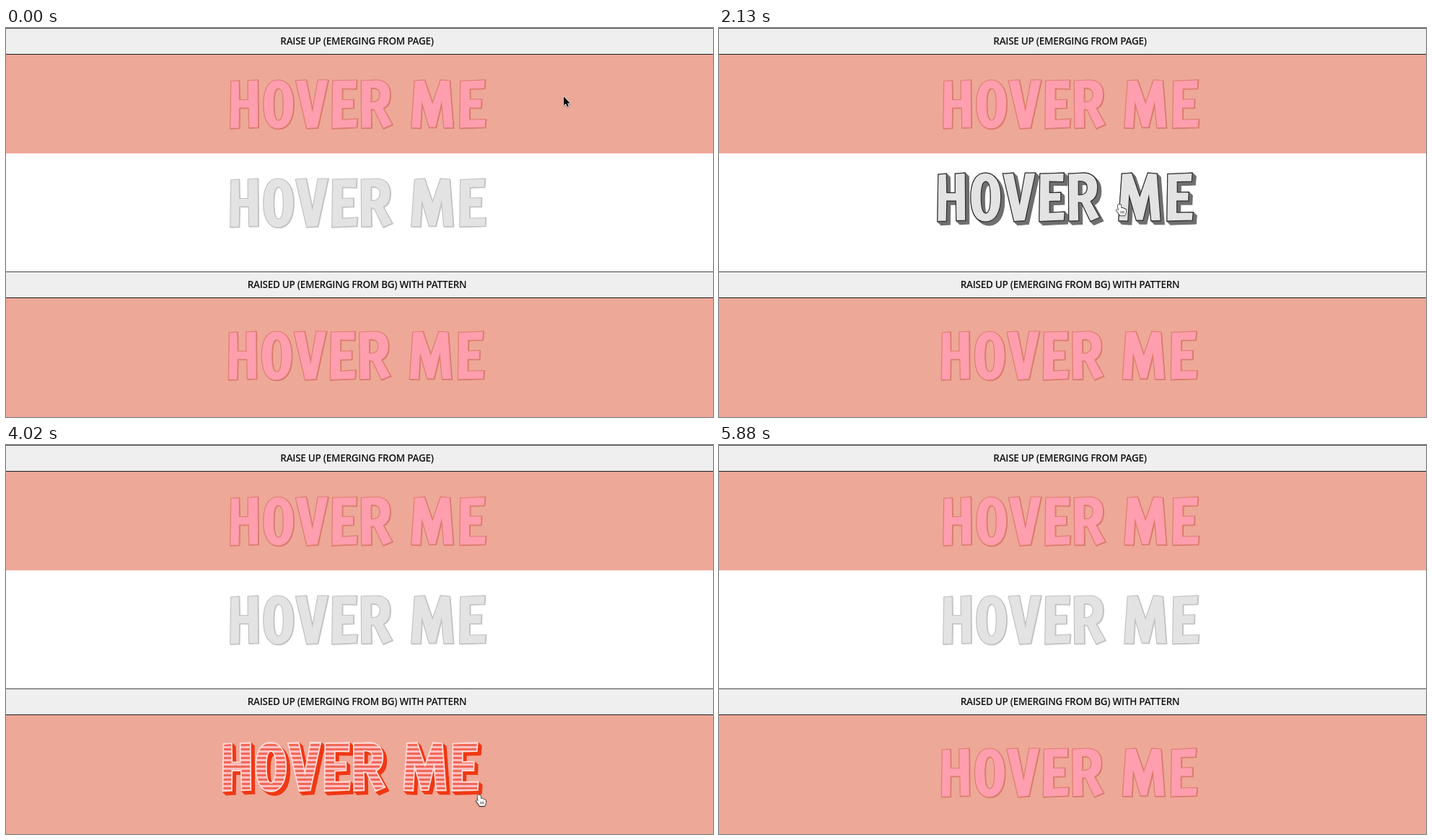
These frames come from a looping animation (980x540 px, 5910 ms). An HTML page with a canvas:

```html
<!DOCTYPE html>
<html lang="en">
<head>
<meta charset="utf-8">
<title>Hover effects</title>
<style>
html, body { margin: 0; width: 980px; height: 540px; overflow: hidden; background: #fff; }
canvas { position: absolute; left: 0; top: 0; }
.band { position: absolute; left: 0; width: 980px; background: #eea898; }
h2 {
  position: absolute; left: 0; margin: 0; width: 973px; height: 35px; padding-right: 7px;
  border: solid #1c1c1c; border-width: 1px 0; border-top-color: #444; background: #efefef; color: #111;
  font: 600 13.5px/35px "Open Sans", "Noto Sans", sans-serif; letter-spacing: -.28px; text-align: center;
}
</style>
</head>
<body>
<div class="band" style="top:37px;height:137px"></div>
<div class="band" style="top:375px;height:165px"></div>
<h2 style="top:0">RAISE UP (EMERGING FROM PAGE)</h2>
<h2 style="top:338px">RAISED UP (EMERGING FROM BG) WITH PATTERN</h2>
<canvas width="980" height="540" role="img" aria-label="HOVER ME, three times"></canvas>
<script>
const LOOP = 5910, STEP = 30, EASE_TIME = 500;
const ctx = document.querySelector('canvas').getContext('2d');

const letters = new Path2D([
  'M312.5 74L324 73L324.5 99.5H336V73L350 72L350.5 138L337.5 138.5L337 111H324.5L324 139L311.5 139.5Z',
  'M378 72C391 72 399.5 84 399.5 105.5C399.5 128 391 140 378 140C365 140 357.5 128 357.5 106C357.5 84 365 72 378 72Z',
  'M378.5 84C374 84 372 92 372 105.5C372 120 374 128 378.5 128C383 128 385 120 385 105.5C385 92 383 84 378.5 84Z',
  'M402 73L417 72L425.5 114L433 72H447.5L433 138.5L417.5 139.5Z',
  'M453.5 73L487 72L486.5 84.5L467 84V99.5L482.5 99V111L467 111.5V127L488 126L487 138L452.5 139.5Z',
  'M493 73L513 72C526 71.5 533.5 79 533.5 92C533.5 102 529.5 109 524 111.5L536.5 134L523.5 139.5L511 113.5L507 113L507.5 138.5L493.5 139Z',
  'M507 83.5V102.5C515 103.5 519 99 519 92.5C519 86 515 83 507 83.5Z',
  'M567 73L581 72L592 104L603 72L616 73L621 138.5H607.5L604.5 105L596.5 138H587L577.5 105L575.5 139L562.5 138.5Z',
  'M630.5 73.5L665 72L664 84L644 84.5V99L660 98.5L659.5 111H643.5V127L666 126.5L665 138L629.5 139Z'
].join(''));
const arrow = new Path2D('M0 0V12.5L3 10L5 14.5L7 13.5L5 9.5H9Z');
const hand = new Path2D('M-1 0C.6 -.6 1.5 .2 1.6 1.5L2 5H4L6.5 6L8.5 7V11L7 15H0L-2.5 11L-5 8C-4.5 6.6 -3 7 -1.8 8.2L-3 2C-3 .8 -2 0 -1 0Z');
const fingers = new Path2D('M1.5 9V12.5M3.5 9V12.5M5.5 9V12.5');

// Colours run from rest to hover.
const pink = {
  face: [[255, 158, 174], [255, 158, 174]],
  edge: [[221, 126, 110], [255, 255, 255]],
  shadow: [[213, 120, 104], [240, 56, 20]]
};
const grey = {
  face: [[227, 227, 227], [227, 227, 227]],
  edge: [[196, 193, 193], [45, 45, 45]],
  shadow: [[200, 196, 196], [110, 110, 110]]
};
const striped = {
  face: [[255, 158, 174], [255, 192, 194]],
  edge: [[221, 126, 110], [255, 220, 214]],
  shadow: pink.shadow,
  stripe: [[238, 164, 152], [241, 104, 88]]
};
const rows = [
  { ...pink, x: -.8, y: 0, line: 1.8, enter: 180, leave: 1160 },
  { ...grey, x: -.8, y: 137, line: 1.2, enter: 1690, leave: 2690 },
  { ...striped, x: -3.2, y: 349, line: 1.8, enter: 3200, leave: 4060 }
];

// Pointer path: time, x, y
const path = [
  [0, 773, 95], [90, 745, 97], [200, 665, 102], [450, 585, 104], [960, 606, 100],
  [1160, 690, 102], [1200, 724, 105], [1330, 741, 130], [1500, 705, 170], [1710, 648, 196],
  [2000, 570, 238], [2400, 560, 250], [2700, 675, 256], [2820, 715, 257], [2900, 717, 262],
  [3030, 710, 290], [3200, 668, 390], [3450, 633, 436], [3800, 618, 450], [4060, 665, 495],
  [4200, 699, 541]
];

const mix = ([from, to], p) => `rgb(${from.map((v, i) => Math.round(v + (to[i] - v) * p))})`;

// CSS "ease": cubic-bezier(.25, .1, .25, 1)
function ease(x) {
  if (x <= 0) return 0;
  if (x >= 1) return 1;
  let lo = 0, hi = 1, u;
  for (let i = 0; i < 20; i++) {
    u = (lo + hi) / 2;
    if (.75 * u * (1 - u) + u ** 3 < x) lo = u; else hi = u;
  }
  return .3 * u * (1 - u) ** 2 + 3 * u * u * (1 - u) + u ** 3;
}

const raised = (row, t) => ease((t - row.enter) / EASE_TIME) - ease((t - row.leave) / EASE_TIME);

function drawRow(row, p) {
  ctx.save();
  ctx.translate(row.x - 8 * p, row.y - 8 * p);
  ctx.lineWidth = 1.2 + (row.line - 1.2) * p;

  const depth = .7 + 4.3 * p;
  ctx.fillStyle = ctx.strokeStyle = mix(row.shadow, p * p);
  for (let d = depth; d > 0; d -= .8) {
    ctx.save();
    ctx.translate(d, d);
    ctx.fill(letters, 'evenodd');
    ctx.stroke(letters);
    ctx.restore();
  }

  ctx.fillStyle = mix(row.face, p);
  ctx.fill(letters, 'evenodd');
  if (row.stripe && p > 0) {
    ctx.save();
    ctx.clip(letters, 'evenodd');
    ctx.globalAlpha = Math.min(1, 2 * p);
    ctx.fillStyle = mix(row.stripe, p);
    for (let y = 74; y < 141; y += 6) ctx.fillRect(300, y, 380, 3);
    ctx.restore();
  }
  ctx.strokeStyle = mix(row.edge, p);
  ctx.stroke(letters);
  ctx.restore();
}

function slope(i, axis) {
  const a = path[Math.max(i - 1, 0)], b = path[Math.min(i + 1, path.length - 1)];
  return (b[axis] - a[axis]) / (b[0] - a[0]);
}

function pointerAt(t) {
  const i = path.findIndex(k => k[0] > t) - 1;
  const a = path[i], b = path[i + 1], span = b[0] - a[0], u = (t - a[0]) / span;
  return [1, 2].map(axis =>
    a[axis] * (1 + 2 * u) * (1 - u) ** 2 + b[axis] * u * u * (3 - 2 * u) +
    span * u * (1 - u) * (slope(i, axis) * (1 - u) - slope(i + 1, axis) * u));
}

function drawPointer(t) {
  if (t >= path[path.length - 1][0]) return;
  const over = rows.some(r => t >= r.enter && t < r.leave);
  ctx.save();
  ctx.translate(...pointerAt(t));
  ctx.lineJoin = 'round';
  ctx.lineWidth = over ? 1.2 : 1.5;
  ctx.strokeStyle = over ? '#111' : '#fff';
  ctx.fillStyle = over ? '#fff' : '#000';
  ctx.shadowColor = 'rgba(0,0,0,.35)';
  ctx.shadowBlur = 2;
  ctx.shadowOffsetY = 1;
  ctx.stroke(over ? hand : arrow);
  ctx.shadowColor = 'transparent';
  ctx.fill(over ? hand : arrow);
  if (over) {
    ctx.lineWidth = .7;
    ctx.stroke(fingers);
  }
  ctx.restore();
}

function draw() {
  const t = Math.floor(performance.now() % LOOP / STEP) * STEP;
  ctx.clearRect(0, 0, 980, 540);
  rows.forEach(row => drawRow(row, raised(row, t)));
  drawPointer(t);
  requestAnimationFrame(draw);
}
draw();
</script>
</body>
</html>
```
